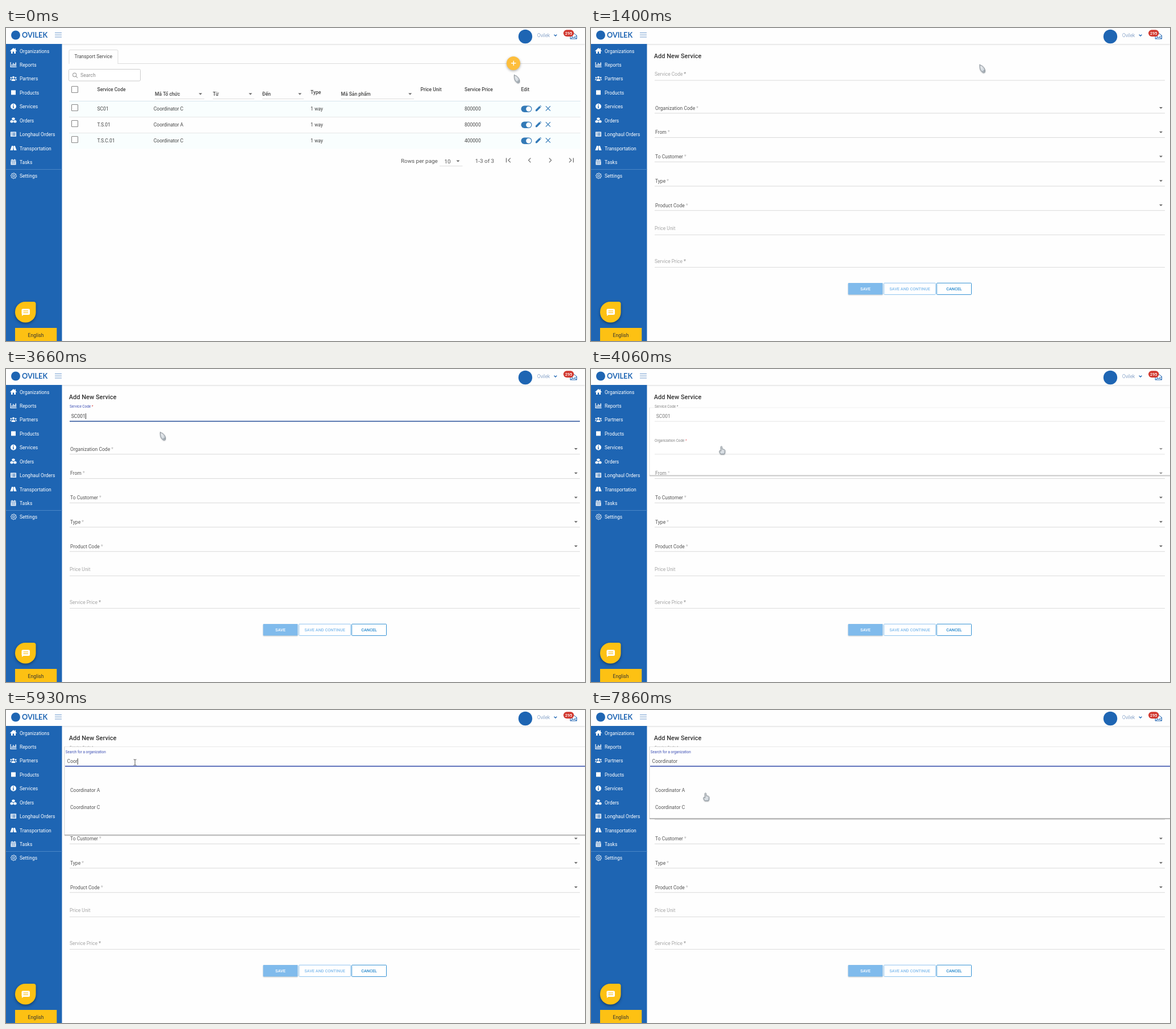
An HTML page with a canvas that plays this animation: 1019x550 px, repeating every 8000 ms.

```html
<!DOCTYPE html>
<html lang="en">
<head>
<meta charset="utf-8">
<title>Add new service</title>
<style>
html, body { margin: 0; width: 100%; height: 100%; overflow: hidden; background: #fefefe; }
canvas { display: block; width: 1019px; height: 550px; }
</style>
</head>
<body>
<canvas id="stage" width="1019" height="550"></canvas>
<script>
const ctx = document.getElementById('stage').getContext('2d');
const LOOP = 8000, W = 1019, H = 550;
const BLUE = '#1e65b3', ACCENT = '#337ab7', INDIGO = '#3f51b5', INK = '#444', YELLOW = '#fdc113', PAGE = '#fefefe';
const FIRMS = ['Coordinator A', 'Coordinator C'];
const QUERY = 'Coordinator', CODE = 'SC001';
const CODE_KEYS = [2460, 2660, 2930, 3060, 3130];
const QUERY_KEYS = [5460, 5530, 5600, 5930, 6000, 6130, 6260, 6400, 6530, 6600, 6730];

const clamp = v => Math.max(0, Math.min(1, v));
const mix = (a, b, k) => a + (b - a) * k;
const easeOut = v => 1 - (1 - clamp(v)) ** 2;
const typed = (s, keys, t) => s.slice(0, keys.filter(k => t >= k - 15).length);

// y is the middle of the capitals
function text(s, x, y, color = INK, size = 8.5, weight = 400, align = 'left', family = 'Roboto') {
  ctx.font = `${weight} ${size}px ${family}, sans-serif`;
  ctx.textAlign = align;
  ctx.fillStyle = color;
  ctx.fillText(s, x, y + size * 0.355);
  return ctx.measureText(s).width;
}
function rect(x, y, w, h, color) {
  ctx.fillStyle = color;
  ctx.fillRect(x, y, w, h);
}
function box(x, y, w, h, r, fill, stroke, lw = 1) {
  ctx.beginPath();
  ctx.roundRect(x, y, w, h, r);
  if (fill) { ctx.fillStyle = fill; ctx.fill(); }
  if (stroke) { ctx.strokeStyle = stroke; ctx.lineWidth = lw; ctx.stroke(); }
}
function disc(x, y, r, color) {
  ctx.beginPath();
  ctx.arc(x, y, r, 0, 7);
  ctx.fillStyle = color;
  ctx.fill();
}
function path(d, x, y, fill, stroke, lw = 1) {
  const p = new Path2D(d);
  ctx.save();
  ctx.translate(x, y);
  ctx.lineJoin = ctx.lineCap = 'round';
  if (fill) { ctx.fillStyle = fill; ctx.fill(p, 'evenodd'); }
  if (stroke) { ctx.strokeStyle = stroke; ctx.lineWidth = lw; ctx.stroke(p); }
  ctx.restore();
}
function shadowed(blur, dy, color, draw) {
  ctx.save();
  ctx.shadowBlur = blur;
  ctx.shadowOffsetY = dy;
  ctx.shadowColor = color;
  draw();
  ctx.restore();
}
const arrow = (x, y) => path('M-3-1.5H3L0 1.5Z', x, y, '#666');

const MENU = [
  ['Organizations', 'M-6 .3L0-5 2.5-2.8V-4.5H4V-1.5L6 .3 5 1 4 .2V5H1.3V1.5H-1.3V5H-4V.2L-5 1Z'],
  ['Reports', 'M-5.5-4.5H-4.3V3.2H5.5V4.4H-5.5ZM-3.2-.5H-1.8V2.3H-3.2ZM-1-3H.4V2.3H-1ZM1.3-1.5H2.7V2.3H1.3ZM3.5-4H4.9V2.3H3.5Z'],
  ['Partners', 'M-2-2.2A2 2 0 1 1 2-2.2 2 2 0 1 1-2-2.2ZM-3.3 4V2.5Q-3 .6 0 .6T3.3 2.5V4ZM-5.4-1.6A1.3 1.3 0 1 1-2.8-1.6 1.3 1.3 0 1 1-5.4-1.6ZM2.8-1.6A1.3 1.3 0 1 1 5.4-1.6 1.3 1.3 0 1 1 2.8-1.6ZM-6 2.5Q-6 .2-3.5 .2L-4 2.5ZM6 2.5Q6 .2 3.5 .2L4 2.5Z'],
  ['Products', 'M-4-4H4V4H-4Z'],
  ['Services', 'M-5 0A5 5 0 1 1 5 0 5 5 0 1 1-5 0ZM-.8-3.2V-1.7H.8V-3.2ZM-1.3-.8V0H-.7V2.2H-1.3V3H1.3V2.2H.8V-.8Z'],
  ['Orders', 'M0-5L2.6-3.9V-1.3L0-.2-2.6-1.3V-3.9ZM-2.9-.4L-.3 .7V3.5L-2.9 4.6-5.5 3.5V.7ZM2.9-.4L5.5 .7V3.5L2.9 4.6 .3 3.5V.7Z'],
  ['Longhaul Orders', 'M-5-4.2H5V4.2H-5ZM-3.7-2.6V-1.5H-2.5V-2.6ZM-1.6-2.6V-1.5H3.7V-2.6ZM-3.7-.5V.6H-2.5V-.5ZM-1.6-.5V.6H3.7V-.5ZM-3.7 1.6V2.7H-2.5V1.6ZM-1.6 1.6V2.7H3.7V1.6Z'],
  ['Transportation', 'M-2.8-4H-.5V-2H.5V-4H2.8L5.6 4H.8V1.5H-.8V4H-5.6ZM-.6-1V.7H.6V-1Z'],
  ['Tasks', 'M-4.5-3.8H-2.9V-5H-1.6V-3.8H1.6V-5H2.9V-3.8H4.5V-2.2H-4.5ZM-4.5-1.5H4.5V5H-4.5ZM-3-.4V1H-1.6V-.4ZM-.7-.4V1H.7V-.4ZM1.6-.4V1H3V-.4ZM-3 2.2V3.6H-1.6V2.2ZM-.7 2.2V3.6H.7V2.2ZM1.6 2.2V3.6H3V2.2Z'],
  ['Settings', '']
];

function gear(x, y) {
  ctx.beginPath();
  for (let i = 0; i <= 32; i++) {
    const a = i * Math.PI / 16, r = i % 4 < 2 ? 5 : 3.9;
    ctx.lineTo(x + r * Math.cos(a), y + r * Math.sin(a));
  }
  ctx.strokeStyle = '#fff';
  ctx.lineWidth = 1;
  ctx.stroke();
  ctx.beginPath();
  ctx.arc(x, y, 1.8, 0, 7);
  ctx.stroke();
}

function frame() {
  shadowed(3, 0.5, 'rgba(0,0,0,.2)', () => rect(0, 0, W, 28, PAGE));
  disc(17, 12.5, 8, BLUE);
  text('OVILEK', 28, 12.3, BLUE, 12.7, 700, 'left', 'Lato');
  for (const y of [8, 11.6, 15.4]) rect(86, y, 12, 1, '#6f9bce');
  disc(914, 15, 12.2, BLUE);
  text('Ovilek', 935, 13, '#5a80b4', 8.5, 300);
  path('M-2-1L0 1 2-1', 967, 13, null, BLUE, 1.3);
  path('M-5.5-.8L0-5 5.5-.8V5H-5.5ZM-5.5-.5L0 3 5.5-.5M-5 4.6L-1.5 2M5 4.6L1.5 2', 999, 14, '#fff', BLUE);
  box(981, 3.2, 18.5, 11.8, 6, '#d1382f');
  text('295', 990.2, 9, '#fff', 7.2, 500, 'center');

  rect(0, 28, 98.5, H - 28, BLUE);
  rect(0, 248, 98.5, 1, '#4a86c6');
  MENU.forEach(([name, icon], i) => {
    const y = 40.4 + i * 24.42;
    if (icon) path(icon, 13, y - 0.3, '#fff'); else gear(13.5, y - 0.4);
    text(name, 24, y + 0.2, '#fff');
  });

  shadowed(5, 2, 'rgba(0,0,0,.4)', () => box(16, 481, 36.5, 36.5, [18, 4, 18, 18], YELLOW));
  box(27.5, 493.5, 14.5, 10.5, 2, '#fff');
  path('M0 0H4L0 3Z', 28, 503, '#fff');
  rect(30.5, 496.5, 8.5, 1.2, YELLOW);
  rect(30.5, 499.7, 8.5, 1.2, YELLOW);
  rect(16, 527, 73.3, 23, YELLOW);
  text('English', 52.5, 539.7, '#333', 8.6, 400, 'center');
}

function listPage(t) {
  path('M197 62.5H1011M111 62.5V40.5Q111 38.5 113 38.5H195Q197 38.5 197 40.5V62.5', 0, 0, null, '#ddd');
  text('Transport Service', 120.5, 50.3);
  box(110.5, 72.5, 126, 20.5, 2, '#fff', '#ccc');
  path('M3.2 0A3.2 3.2 0 1 1-3.2 0 3.2 3.2 0 1 1 3.2 0M2.4 2.4L5 5', 120.7, 82.4, null, '#aaa', 1.2);
  text('Search', 131, 82.8, '#8a8a8a', 8.7);

  const check = y => box(115.5, y - 5.5, 11, 11, 1, '#fff', '#888', 1.1);
  check(108);
  for (const [s, x] of [['Service Code', 160.5], ['Price Unit', 729.5], ['Service Price', 807], ['Edit', 906.5]])
    text(s, x, 107.7, INK, 8.5, 500);
  text('Type', 536, 112.7, INK, 8.5, 500);
  for (const [s, x, end] of [['Mã Tổ chức', 262, 349], ['Từ', 364, 437], ['Đến', 451, 524], ['Mã Sản phẩm', 589.5, 718]]) {
    text(s, x, 116.3, INK, 8.5, 500);
    arrow(end - 6.8, 116);
    rect(x, 124, end - x, 1, '#ddd');
  }
  const rows = [['SC01', 1, 800000], ['T.S.01', 0, 800000], ['T.S.C.01', 1, 400000]];
  rows.forEach(([code, firm, price], i) => {
    const y = 142.4 + i * 28;
    if (i % 2 === 0) rect(111, y - 14, 900, 28, '#f9fefe');
    rect(111, y - 14.4, 900, 1, i ? '#e6e8e8' : '#d8e6ee');
    check(y - 2.4);
    text(code, 160.5, y);
    text(FIRMS[firm], 259.8, y);
    text('1 way', 536, y);
    text(price, 807, y);
    box(906.5, y - 6, 19, 11.6, 6, ACCENT);
    disc(919.8, y - 0.2, 4.5, '#fff');
    path('M-5 5V2.5L1.8-4.2 4.2-1.8-2.5 5ZM2.5-4.9L3.3-5.5 5.3-3.5 4.9-2.5Z', 937, y - 1.2, ACCENT);
    path('M-3.7-3.7L3.7 3.7M3.7-3.7L-3.7 3.7', 954, y - 1, null, ACCENT, 1.2);
  });

  text('Rows per page', 695, 233.3, '#555', 9.85);
  text('10', 771.5, 234.3, '#555', 9.85);
  arrow(795.5, 234);
  rect(763, 242, 40.5, 1, '#ddd');
  text('1-3 of 3', 825.8, 233.3, '#555', 9.85);
  path('M-3.5-3.5V3.5M3.5-3.5L0 0 3.5 3.5', 884, 232.3, null, '#666', 1.2);
  path('M1.7-3.5L-1.7 0 1.7 3.5', 921.3, 232.3, null, '#666', 1.2);
  path('M-1.7-3.5L1.7 0-1.7 3.5', 958, 232.3, null, '#666', 1.2);
  path('M3.5-3.5V3.5M-3.5-3.5L0 0-3.5 3.5', 995, 232.3, null, '#666', 1.2);

  const pressed = t >= 845;
  shadowed(pressed ? 8 : 4, pressed ? 4 : 1.5, 'rgba(0,0,0,.35)', () => disc(893, 62, 12, pressed ? '#f7b02c' : '#fdbe3c'));
  path('M-3.7 0H3.7M0-3.7V3.7', 893.3, 61.8, null, '#fff', 1.4);
}

function label(s, x, y, color, size, star) {
  const w = text(s, x, y, color, size);
  if (star) text('*', x + w + size * 0.25, y, star, size);
}

function formPage(t) {
  text('Add New Service', 110.8, 49.3, '#333', 11, 500);

  const lift = easeOut((t - 1930) / 260), focus = t >= 1930 && t < 3915;
  const tint = focus ? INDIGO : lift ? '#888' : '#a6a6a6';
  label('Service Code', 112, mix(81, 66, lift), tint, mix(8.5, 6.4, lift), focus ? '#d9534f' : '#888');
  rect(112, 91.5, 898, 1, '#dcdcdc');
  if (focus) {
    const half = 449 * lift;
    rect(561 - half, 91, half * 2, 1.5, '#2f569f');
  }
  const code = typed(CODE, CODE_KEYS, t);
  const w = text(code, 114.8, 83);
  if (focus) rect(115 + w, 78, 1, 10, '#333');

  const open = easeOut((t - 3900) / 130);
  ['Organization Code', 'From', 'To Customer', 'Type', 'Product Code'].forEach((s, i) => {
    const y = 140.6 + i * 42.75, k = i ? 0 : open;
    label(s, mix(113, 112, k), mix(y, y - 14.4, k), '#555', mix(8.55, 6.4, k), k ? '#e0434a' : '#b5b5b5');
    arrow(1003, y);
    rect(112, y + 8.6, 898, 1, '#d9d9d9');
  });
  label('Price Unit', 112, 352.3, '#a6a6a6', 8.5);
  rect(112, 363, 898, 1, '#dcdcdc');
  label('Service Price', 112, 409.7, '#a6a6a6', 8.5, '#888');
  rect(112, 420, 898, 1, '#dcdcdc');

  shadowed(2, 1, 'rgba(0,0,0,.2)', () => box(452.5, 448, 61, 20.5, 1, '#80bbec'));
  text('SAVE', 483, 458.4, '#fff', 7.3, 500, 'center');
  box(515.5, 448.2, 91, 20.2, 1, '#fff', '#8fc3ee');
  text('SAVE AND CONTINUE', 561, 458.4, '#80bbec', 7.3, 500, 'center');
  box(608.5, 448.2, 61, 20.2, 1, '#fff', '#2f8fd3');
  text('CANCEL', 639, 458.4, '#2487cc', 7.3, 500, 'center');
}

function dropdown(t) {
  const k = easeOut((t - 3990) / 150);
  if (!k) return;
  const busy = (t >= 5915 && t < 6045) || (t >= 7115 && t < 7245);
  const scale = mix(0.8, 1, k), mid = 127.5;
  const top = mid - 63 * scale, bottom = mid + 63 * scale + (busy ? 29 : 0);
  ctx.save();
  ctx.globalAlpha = k ** 4;
  rect(103, top, W - 103, bottom - top, PAGE);

  // the options fade in after the sheet
  ctx.globalAlpha = clamp(k * 4 - 3);
  if (t < 5915) rect(104, 126.5, W - 104, 29.5, '#f9f9fb');
  FIRMS.forEach((s, i) => text(s, 113, 141.4 + i * 29.3, '#555'));

  const focus = t >= 4690, lift = focus ? 1 - (1 - clamp((t - 4690) / 460)) ** 3 : 0;
  rect(104, 98, W - 104, 1, '#ccc');
  if (focus) rect(104, 98, W - 104, 1.5, '#3049a8');
  text('Search for a organization', 104.8, mix(90, 73.3, lift), focus ? INDIGO : '#999', mix(8.5, 6.37, lift));
  const w = text(typed(QUERY, QUERY_KEYS, t), 107.6, 90, '#555');
  const blinkOff = (t >= 7245 && t < 7515) || t >= 7780;
  if (focus && !blinkOff) rect(107.6 + w, 85, 1, 11, '#333');

  ctx.globalAlpha = k;
  rect(103, top - 0.5, W - 103, 1, 'rgba(0,0,0,.08)');
  rect(102.4, top, 1, bottom - top, 'rgba(0,0,0,.17)');
  rect(103, bottom - 0.5, W - 103, 1.2, 'rgba(0,0,0,.36)');
  rect(103, bottom + 0.7, W - 103, 1.3, 'rgba(0,0,0,.13)');
  ctx.restore();
}

// time, x, y of the pointer's hot spot
const TRACK = [
  [0, 894, 82], [230, 894, 82], [600, 891, 60], [970, 891, 60], [1400, 685, 64], [1660, 345, 84],
  [1770, 345, 84], [1930, 311, 86.5], [3430, 311, 86.5], [3900, 229.5, 135.5], [4500, 229.5, 135.5],
  [4800, 227, 92], [7670, 227, 92], [7850, 201.5, 145.5], [LOOP, 201.5, 145.5]
];
const SHAPES = [[0, 'arrow'], [500, 'hand'], [1060, 'arrow'], [1600, 'beam'], [3540, 'arrow'], [3840, 'hand'], [4735, 'beam'], [7720, 'hand']];

function pointer(t) {
  const i = TRACK.findIndex(p => p[0] > t);
  const [t0, x0, y0] = TRACK[i - 1], [t1, x1, y1] = TRACK[i];
  const k = (t - t0) / (t1 - t0), x = mix(x0, x1, k), y = mix(y0, y1, k);
  const shape = SHAPES.filter(s => s[0] <= t).pop()[1];
  if (shape === 'beam') {
    path('M-2-5H-.7L0-4.3 .7-5H2M0-4.3V4.3M-2 5H-.7L0 4.3 .7 5H2', x, y, null, '#555', 1);
    return;
  }
  const g = ctx.createLinearGradient(0, 0, 8, 14);
  g.addColorStop(0, '#fff');
  g.addColorStop(1, '#c3ccd4');
  shadowed(2, 1, 'rgba(60,70,80,.35)', () => shape === 'hand'
    ? path('M-.9 .7Q0-.4 .9 .7L1.4 5.2Q5.5 5.2 6.3 7V11.5L5.2 14H-1.2L-3.4 10.5-3.2 7.8-.9 8.4Z', x, y, g, '#858e96', 0.9)
    : path('M.5 .5Q6 2 8.5 6.5 10.5 10 9.5 13.5L7 14.5Q3 12.5 1.5 9 .5 5 .5 .5ZM9.5 10.5L6 12', x, y, g, '#858e96', 0.9));
}

function render(t) {
  rect(0, 0, W, H, PAGE);
  if (t < 1110) listPage(t); else formPage(t);
  dropdown(t);
  frame();
  pointer(t);
}

const start = performance.now();
function tick() {
  render((performance.now() - start) % LOOP);
  requestAnimationFrame(tick);
}
tick();
</script>
</body>
</html>
```
